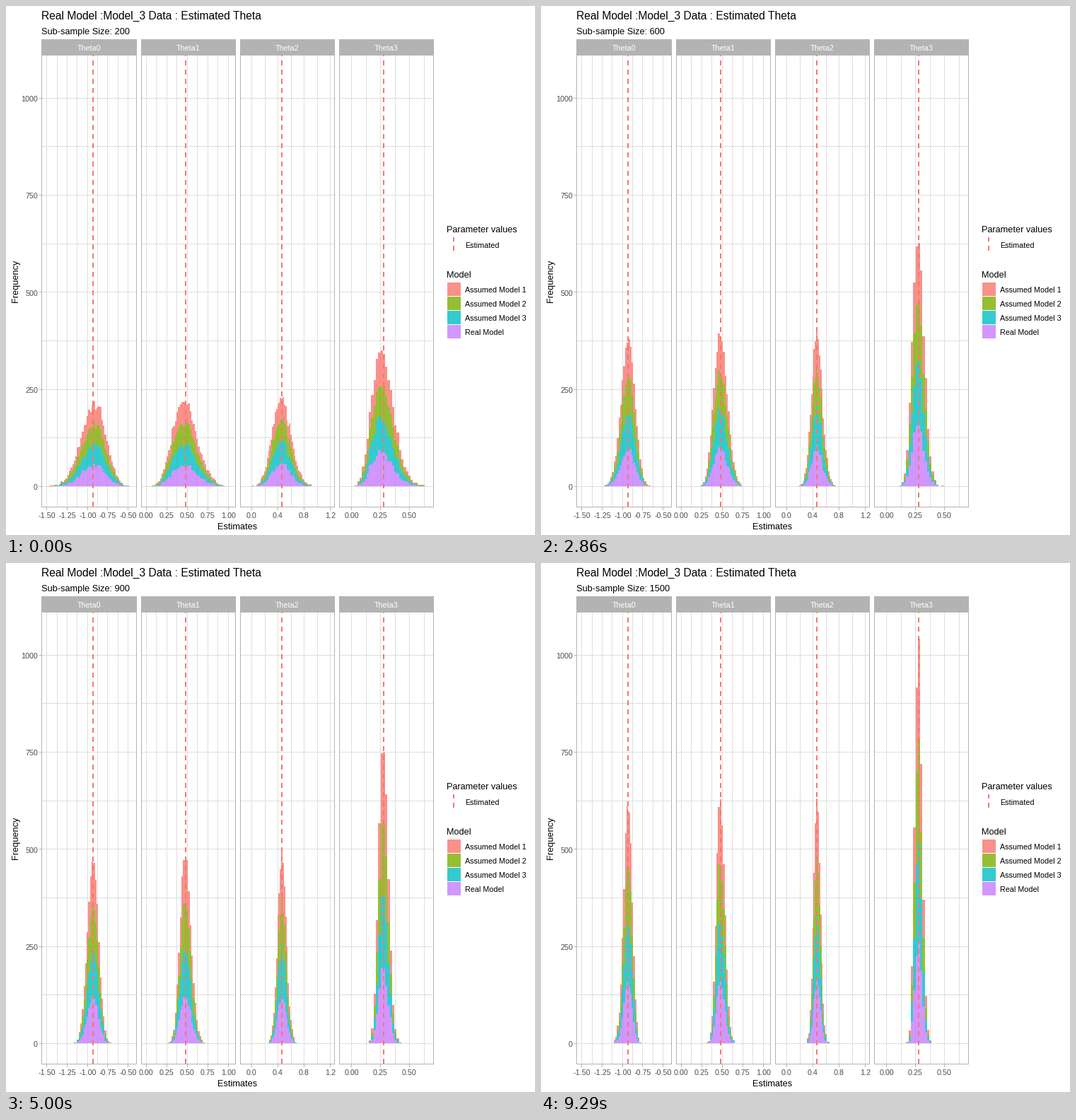
Animation, 748 px wide and 748 px high, one loop 10000 ms. Source, as a matplotlib script:

```python
import math

import matplotlib.pyplot as plt
import numpy as np
from matplotlib.animation import FuncAnimation
from matplotlib.collections import LineCollection, PolyCollection
from matplotlib.patches import Rectangle

SIZE, DPI = 748, 88
PT = 72 / DPI  # points per pixel
plt.rcParams["font.family"] = ["Liberation Sans"]

GRID, FRAME, INK = "#dedede", "#b3b3b3", "#4d4d4d"
LINE = "#f8766d"
FILLS = ["#c77cff", "#00bfc4", "#7cae00", "#f8766d"]  # bottom to top
NAMES = ["Real Model", "Assumed Model 3", "Assumed Model 2", "Assumed Model 1"]
TITLE_PX, TEXT_PX, SMALL_PX = 15.6, 12.8, 10.8

TOP, BOTTOM = 69, 708
ZERO, UNIT = 679.5, 0.5494  # pixel row of zero, pixels per count
BIN, DRAWS = 0.02, 1000
SIZES = range(200, 1501, 100)
TICKS, TICK_MS = 200, 50

# left, right, x of zero, pixels per unit, first tick, step, ticks, decimals,
# line x, mean, spread at 200, decay power, skew at 200
PANELS = [
    (50, 184, 230.0, 114.7, -1.5, 0.25, 5, 2, 123, -0.935, 0.1505, 0.532, -0.04),
    (191, 324, 198.0, 116.5, 0.0, 0.25, 5, 2, 254, 0.482, 0.146, 0.532, 0.06),
    (331, 464, 347.5, 92.5, 0.0, 0.4, 4, 1, 390, 0.463, 0.142, 0.51, 0.03),
    (471, 604, 488.5, 164.0, 0.0, 0.25, 3, 2, 534, 0.276, 0.092, 0.55, 0.07),
]

fig = plt.figure(figsize=(SIZE / DPI, SIZE / DPI), dpi=DPI, facecolor="white")
ax = fig.add_axes([0, 0, 1, 1])
ax.set_xlim(0, SIZE)
ax.set_ylim(SIZE, 0)
ax.axis("off")


def text(x, y, s, px, color="black", **kw):
    return ax.text(x, y, s, fontsize=px * PT, color=color, va="baseline", **kw)


def box(x0, y0, x1, y1, **kw):
    ax.add_patch(Rectangle((x0, y0), x1 - x0, y1 - y0, antialiased=False,
                           snap=False, **kw))


def segment(x0, y0, x1, y1):
    """One-pixel line through pixel centres."""
    return [(math.floor(x0) + 0.5, math.floor(y0) + 0.5),
            (math.floor(x1) + 0.5, math.floor(y1) + 0.5)]


def add_lines(segments, color, z):
    lines = LineCollection(segments, colors=color, linewidths=PT, zorder=z,
                           antialiaseds=False, capstyle="butt")
    lines.set_snap(False)
    ax.add_collection(lines, autolim=False)


def dashed(x, y0, y1):
    ax.plot([x, x], [y0, y1], color=LINE, lw=2 * PT, zorder=4, antialiased=False,
            snap=False, dashes=(3.175, 3.175), dash_capstyle="butt")


def count_y(n):
    return ZERO - n * UNIT


def draw_panel(i, panel):
    left, right, x0, scale, first, step, ticks, digits, line = panel[:9]
    grid = [segment(left, count_y(n), right, count_y(n))
            for n in range(0, 1001, 125)]
    for k in range(-1, 2 * ticks + 1):
        x = x0 + scale * (first + k * step / 2)
        if left < x < right:
            grid.append(segment(x, TOP, x, BOTTOM))
    add_lines(grid, GRID, 1)

    marks = []
    for k in range(ticks):
        value = first + k * step
        x = x0 + scale * value
        marks.append(segment(x, BOTTOM + 1, x, BOTTOM + 4))
        text(x, 724, f"{value:.{digits}f}", SMALL_PX, INK, ha="center")
    add_lines(marks, FRAME, 1)

    dashed(line, BOTTOM, TOP)
    box(left + 0.5, TOP + 0.5, right + 0.5, BOTTOM + 0.5, fill=False,
        ec=FRAME, lw=PT, zorder=5)
    box(left, 47, right + 1, TOP, fc=FRAME, lw=0, zorder=5)
    text((left + right) / 2 + 0.5, 63, f"Theta{i}", SMALL_PX, "white",
         ha="center", zorder=6)


def draw_legend():
    text(623, 319.5, "Parameter values", TEXT_PX)
    dashed(633, 346, 327)
    text(649, 341.5, "Estimated", SMALL_PX)
    text(623, 384, "Model", TEXT_PX)
    for k, (name, fill) in enumerate(zip(NAMES[::-1], FILLS[::-1])):
        y = math.floor(391 + 20.3 * k)
        box(624, y, 643, y + 19, fc=fill, lw=0, alpha=0.8)
        text(649, y + 14.3, name, SMALL_PX)


def cdf(x, mean, sd, skew):
    # normal variable u bent into u + skew * (u^2 - 1)
    z = (x - mean) / sd
    root = np.sqrt(np.maximum(1 + 4 * skew * (z + skew), 0))
    u = (root - 1) / (2 * skew)
    return np.array([0.5 * (1 + math.erf(v / math.sqrt(2))) for v in u])


def histogram(i, n):
    """Bin edges in pixels and the counts of each model."""
    left, right, x0, scale = PANELS[i][:4]
    mean, sd, power, skew = PANELS[i][9:]
    lo = math.ceil((left + 5 - x0) / scale / BIN)
    hi = math.floor((right - 5 - x0) / scale / BIN)
    edges = (np.arange(lo, hi + 1) + 0.5) * BIN
    ratio = n / 200
    p = np.diff(cdf(edges, mean, sd * ratio ** -power, skew * ratio ** -0.5))
    p = np.maximum(p, 0)
    p /= p.sum()
    rng = np.random.default_rng(n + 7 * i)
    drawn = rng.multinomial(DRAWS, p, size=len(FILLS))
    counts = np.where(drawn > 0, 0.45 * DRAWS * p + 0.55 * drawn, 0)
    return np.round(x0 + scale * edges), counts


def stack(n):
    """Rectangles of every model for one sub-sample size."""
    rects = [[] for _ in FILLS]
    for i in range(len(PANELS)):
        edges, counts = histogram(i, n)
        levels = np.floor(count_y(np.cumsum(counts, axis=0)))
        base = np.full(counts.shape[1], math.floor(ZERO))
        for out, level in zip(rects, levels):
            for a, b, y0, y1 in zip(edges[:-1], edges[1:], base, level):
                if y1 < y0 and b > a:
                    out.append([(a, y0), (b, y0), (b, y1), (a, y1)])
            base = level
    return rects


text(50, 19.3, "Real Model :Model_3 Data : Estimated Theta", TITLE_PX)
subtitle = text(50, 40, "", TEXT_PX)
text(327.5, 740.5, "Estimates", TEXT_PX, ha="center")
ax.text(20, 388.5, "Frequency", fontsize=TEXT_PX * PT, rotation=90,
        ha="right", va="center")
for n in range(0, 1001, 250):
    text(45, count_y(n) + 4.8, str(n), SMALL_PX, INK, ha="right")
add_lines([segment(47, count_y(n), 50, count_y(n)) for n in range(0, 1001, 250)],
          FRAME, 1)
for i, panel in enumerate(PANELS):
    draw_panel(i, panel)
draw_legend()

bars = []
for fill in FILLS:
    coll = PolyCollection([], facecolors=fill, alpha=0.8, linewidths=0,
                          antialiaseds=False, zorder=3)
    ax.add_collection(coll, autolim=False)
    bars.append(coll)

stacks = [stack(n) for n in SIZES]


def update(tick):
    # each size holds an equal share of the loop, starting on a whole tick
    step = ((tick + 1) * len(SIZES) - 1) // TICKS
    subtitle.set_text(f"Sub-sample Size: {SIZES[step]}")
    for coll, rects in zip(bars, stacks[step]):
        coll.set_verts(rects)
    return [subtitle, *bars]


anim = FuncAnimation(fig, update, frames=TICKS, interval=TICK_MS,
                     repeat=True, repeat_delay=0, blit=False)
plt.show()
```
